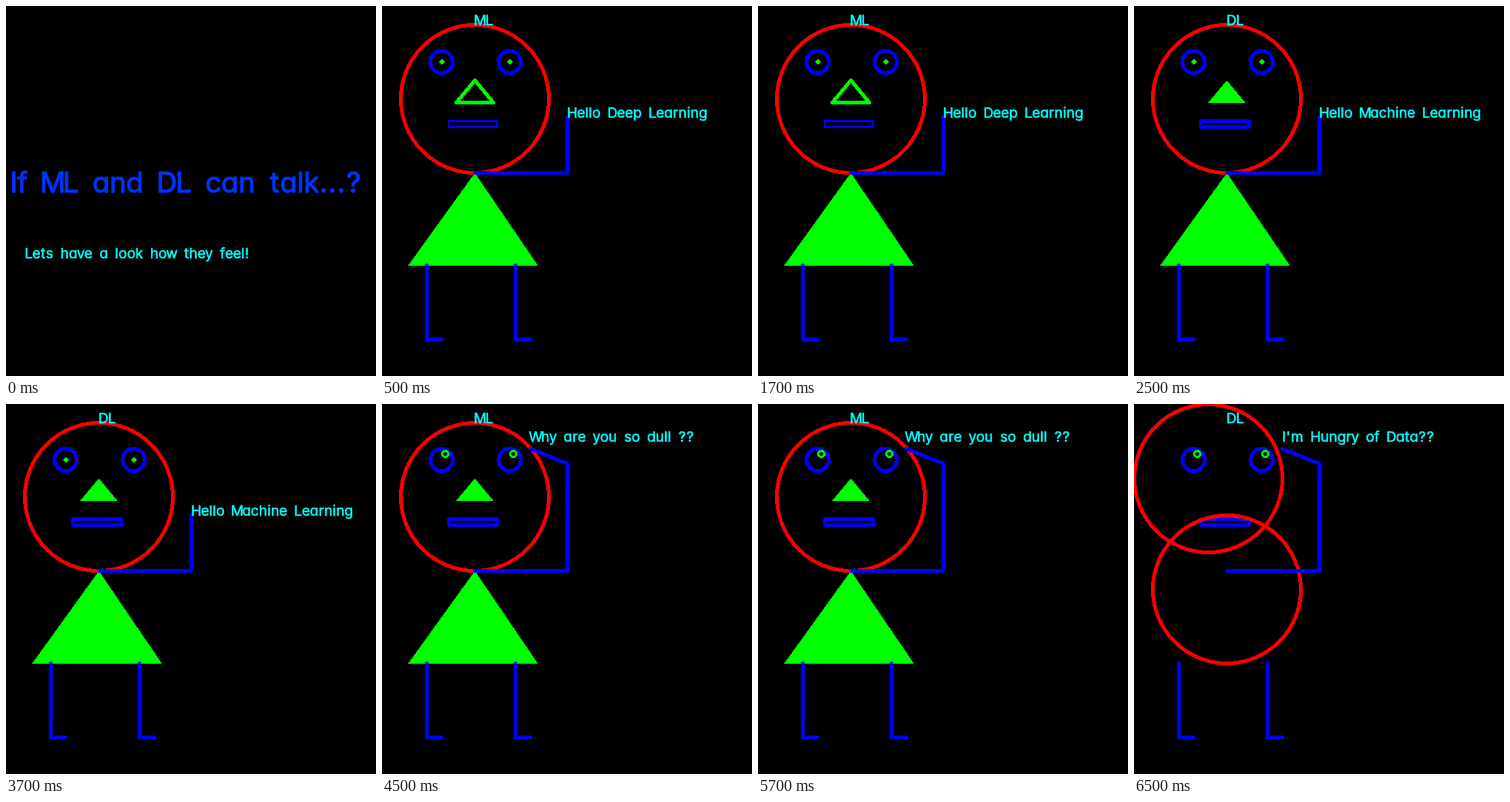
Animation of 500 by 500 pixels, one loop 8 s. Source, as an HTML page:

```html
<!DOCTYPE html>
<html lang="en">
<head>
<meta charset="utf-8">
<title>If ML and DL can talk</title>
<style>
  html, body { margin: 0; width: 100%; height: 100%; overflow: hidden; background: #000; }
  svg { display: block; width: 100%; height: 100%; }
  .shapes { fill: none; stroke-width: 5; stroke-linecap: round; stroke-linejoin: round; shape-rendering: crispEdges; }
  .solid { stroke: none; }
  text {
    font-family: Inter, "Open Sans", sans-serif;
    font-feature-settings: "cv11"; /* single-storey a */
    text-anchor: middle;
    stroke: currentColor;
    fill: currentColor;
    stroke-linejoin: round;
  }
</style>
</head>
<body>
<svg id="stage" viewBox="0 0 500 500"></svg>
<script>
const LOOP = 8000;
const RED = "#f00", GREEN = "#0f0", BLUE = "#00f", CYAN = "#0ff";

// Advance widths of the plotter lettering, in units; other letters take 19.
const ADVANCE = {};
const groups = { 8: "Iil", 10: ".!'", 12: "ft", 13: "r", 16: " vy", 17: "Lsk", 18: "ec?", 21: "D", 22: "Hw", 24: "MW", 30: "m" };
for (const [width, chars] of Object.entries(groups))
  for (const c of chars) ADVANCE[c] = +width;

// Each letter is centred in its own cell.
function label(str, x, y, color = CYAN, scale = 0.6) {
  let pen = 0;
  const xs = [...str].map(c => {
    const w = ADVANCE[c] || 19;
    pen += w;
    return (x + 0.5 + (pen - w / 2) * scale).toFixed(1);
  });
  return `<text x="${xs.join(" ")}" y="${y + 1.3 * scale}" color="${color}"
    font-size="${32 * scale}" stroke-width="${scale}">${str}</text>`;
}

const circle = (x, y, r, color, width = 5) =>
  `<circle cx="${x}" cy="${y}" r="${r}" stroke="${color}" stroke-width="${width}"/>`;
const line = (points, color = BLUE, width = 5) =>
  `<polyline points="${points}" stroke="${color}" stroke-width="${width}"/>`;
const solid = points => `<polygon class="solid" points="${points}" fill="${GREEN}"/>`;
const shapes = body => `<g class="shapes" transform="translate(.5 .5)">${body}</g>`;

const EYES = [80, 172];
const NOSE = "125,100 100,130 150,130";
const WAVE = "125,225 250,225 250,150";
const SCRATCH = "125,225 250,225 250,80 200,60";

function pupil(x, lookUp) {
  return lookUp ? circle(x + 5, 67, 4, GREEN, 3)
    : solid(`${x - 4},75 ${x},71 ${x + 4},75 ${x},79`);
}

function figure({ name, speech, at, arm, lookUp, openNose, thinMouth, round }) {
  const mouth = `<rect x="90" y="155" width="65" height="8" stroke="${BLUE}" stroke-width="${thinMouth ? 3 : 5}"/>`;
  const nose = openNose ? line(NOSE + " 125,100", GREEN, 5) : solid(NOSE);
  return shapes(
    mouth +
    (round ? circle(100, 100, 100, RED) + circle(125, 250, 100, RED)
           : circle(125, 125, 100, RED) + nose + solid("125,225 35,350 210,350")) +
    EYES.map(x => circle(x, 75, 15, BLUE) + pupil(x, lookUp)).join("") +
    line(arm) +
    [60, 180].map(x => line(`${x},350 ${x},450 ${x + 20},450`)).join("")
  ) + label(name, 125, 25) + label(speech, ...at);
}

const scenes = [
  [0, label("If ML and DL can talk...?", 5, 250, "#0032ff", 1.2) +
      label("Lets have a look how they feel!", 25, 340)],
  [500, figure({ name: "ML", speech: "Hello Deep Learning", at: [250, 150], arm: WAVE, openNose: true, thinMouth: true })],
  [2500, figure({ name: "DL", speech: "Hello Machine Learning", at: [250, 150], arm: WAVE })],
  [4500, figure({ name: "ML", speech: "Why are you so dull ??", at: [200, 50], arm: SCRATCH, lookUp: true })],
  [6500, figure({ name: "DL", speech: "I'm Hungry of Data??", at: [200, 50], arm: SCRATCH, lookUp: true, round: true })]
];

const stage = document.getElementById("stage");
const start = performance.now();
let shown;

function draw(now) {
  const t = Math.max(0, now - start) % LOOP;
  const scene = scenes.findLast(([from]) => t >= from);
  if (scene !== shown) {
    shown = scene;
    stage.innerHTML = scene[1];
  }
  requestAnimationFrame(draw);
}
draw(start);
</script>
</body>
</html>
```
